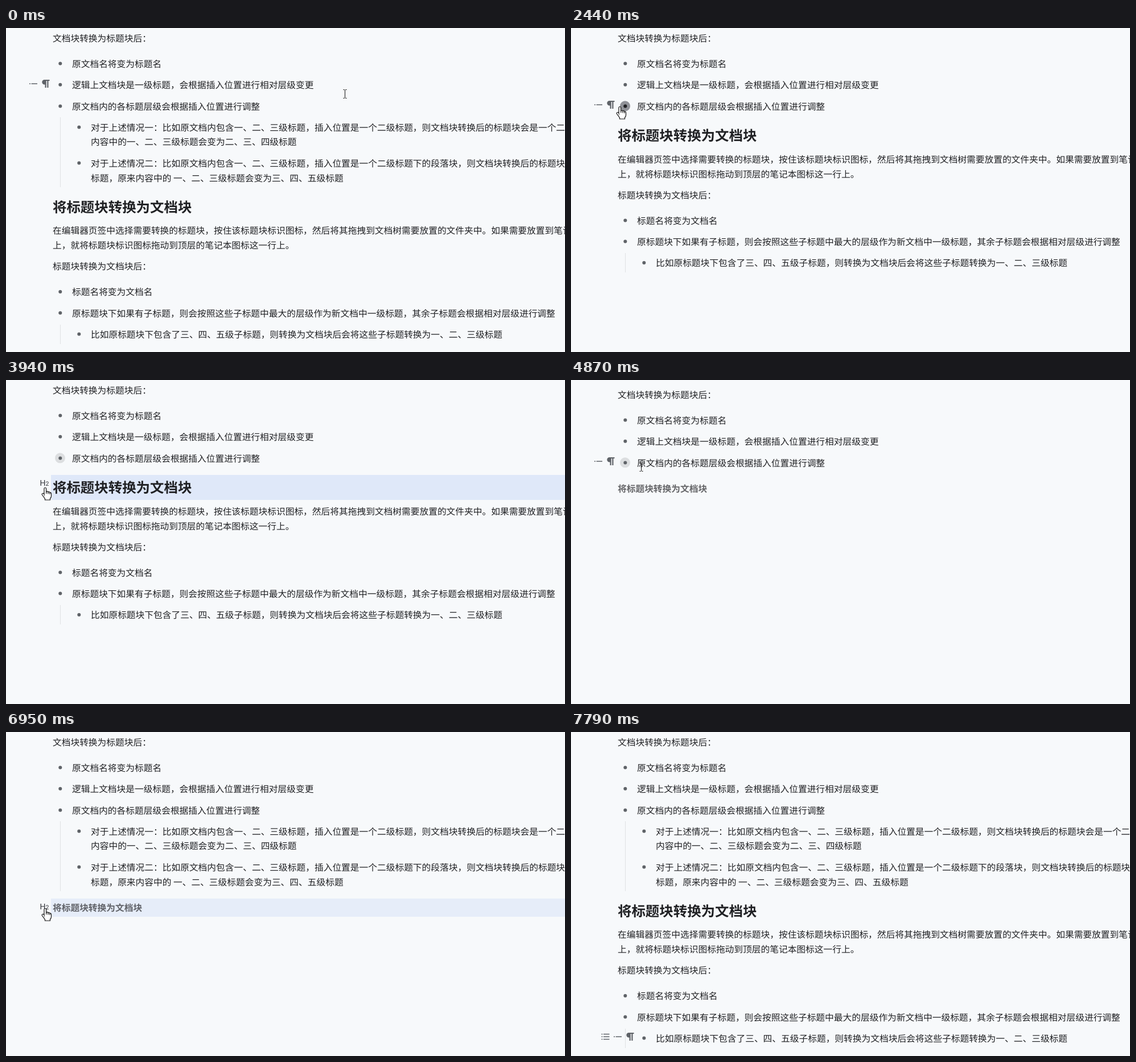
Recreate the animation shown at these times as an HTML page with a canvas. Size 982x570 px, loop 8.57 s.

```html
<!DOCTYPE html>
<html lang="zh-CN">
<head>
<meta charset="utf-8">
<style>
html, body { margin: 0; width: 100%; height: 100%; overflow: hidden; background: #f7f9fb; }
canvas { display: block; }
</style>
</head>
<body>
<canvas width="982" height="570"></canvas>
<script>
const ctx = document.querySelector('canvas').getContext('2d');
ctx.textRendering = 'geometricPrecision';
const LOOP = 8570, INK = '#202124', GREY = '#5f6368';
const LIST_FOLD = [1930, 5320], HEAD_FOLD = [3945, 6980];
const NESTED_HEIGHT = 125.6;

// [x, centre y, text, bullet]
const intro = [
  [82, 18, '文档块转换为标题块后：'],
  [116, 63, '原文档名将变为标题名', 1],
  [116, 100.3, '逻辑上文档块是一级标题，会根据插入位置进行相对层级变更', 1],
  [116, 138, '原文档内的各标题层级会根据插入位置进行调整', 1],
];
const nested = [
  [149, 175, '对于上述情况一：比如原文档内包含一、二、三级标题，插入位置是一个二级标题，则文档块转换后的标题块会是一个二级标题', 1],
  [149, 200.5, '内容中的一、二、三级标题会变为二、三、四级标题'],
  [149, 238, '对于上述情况二：比如原文档内包含一、二、三级标题，插入位置是一个二级标题下的段落块，则文档块转换后的标题块会是', 1],
  [149, 263.7, '标题，原来内容中的 一、二、三级标题会变为三、四、五级标题'],
];
const section = [
  [82, 356.5, '在编辑器页签中选择需要转换的标题块，按住该标题块标识图标，然后将其拖拽到文档树需要放置的文件夹中。如果需要放置到笔记本'],
  [82, 382.3, '上，就将标题块标识图标拖动到顶层的笔记本图标这一行上。'],
  [82, 419.5, '标题块转换为文档块后：'],
  [116, 464.5, '标题名将变为文档名', 1],
  [116, 501.7, '原标题块下如果有子标题，则会按照这些子标题中最大的层级作为新文档中一级标题，其余子标题会根据相对层级进行调整', 1],
  [149, 539, '比如原标题块下包含了三、四、五级子标题，则转换为文档块后会将这些子标题转换为一、二、三级标题', 1],
];

// Pointer: [time, x, y]
const path = [
  [0, 595, 116], [160, 595, 116], [600, 330, 140], [1010, 133, 155], [1030, 133, 155],
  [1510, 86, 138], [2440, 86, 138], [2800, 82, 170], [3250, 70, 190], [3380, 70, 190],
  [3600, 68, 188], [3900, 69, 189], [4370, 69, 189], [4640, 158, 172], [4870, 123, 153],
  [5120, 90, 147], [5690, 90, 147], [6100, 117, 295], [6530, 88, 326], [6740, 88, 326],
  [6900, 69, 310], [7250, 69, 310], [7580, 240, 360], [7600, 240, 360], [7790, 680, 590], [LOOP, 680, 590],
];
// Gutter icons: [time, kind, y]
const gutter = [
  [0, 'item', 98], [260, 'item', 135], [2700, 'h2', 181], [3960, '', 0], [4740, 'item', 143],
  [5320, '', 0], [5980, 'h2', 307], [7450, 'para', 354], [7660, 'list', 462], [7690, 'item', 499], [7720, 'nested', 536],
];

const between = (t, [a, b]) => t >= a && t < b;
const lerp = (a, b, k) => a + (b - a) * k;
const ease = k => k * k * (3 - 2 * k);

function pointerAt(t) {
  const i = Math.max(1, path.findIndex(p => p[0] > t));
  const [t0, x0, y0] = path[i - 1], [t1, x1, y1] = path[i];
  const k = ease((t - t0) / (t1 - t0));
  return [lerp(x0, x1, k), lerp(y0, y1, k)];
}

// 1 = full-size heading, 0 = folded
function headingSize(t) {
  const out = (start, length) => {
    const k = Math.min(1, Math.max(0, (t - start) / length));
    return 1 - (1 - k) ** 2;
  };
  return t < HEAD_FOLD[1] ? 1 - out(HEAD_FOLD[0], 75) : out(HEAD_FOLD[1], 95);
}

function text(str, x, y, size, weight = 400, family = '"Noto Sans CJK SC", "Noto Sans CJK"') {
  ctx.font = `${weight} ${size}px ${family}, sans-serif`;
  ctx.fillText(str, x, y);
}

function disc(x, y, r, color) {
  ctx.fillStyle = color;
  ctx.beginPath();
  ctx.arc(x, y, r, 0, 7);
  ctx.fill();
}

function rows(list, dy) {
  for (const [x, y, str, bullet] of list) {
    if (bullet) disc(x - 20.7, y + dy - .5, 3, GREY);
    ctx.fillStyle = INK;
    text(str, x, y + dy + 5.8, 15.72);
  }
}

function rule(y, height) {
  ctx.fillStyle = '#dfe1e4';
  ctx.fillRect(95, y, 1, height);
}

function drawGutter(kind, y, active) {
  ctx.fillStyle = active ? '#303238' : GREY;
  if (!kind) return;
  if (kind === 'h2') {
    text('H', 59.5, y + 5, 14, 400, 'Roboto');
    text('2', 69.5, y + 5, 10.5, 400, 'Roboto');
    return;
  }
  const dx = kind === 'nested' ? 34 : 0;
  ctx.save();
  ctx.translate(dx, y);
  ctx.fill(new Path2D('M76.5-7H67.5a4.2 4.2 0 0 0 0 8.4H68.5V7H70.7V-5H72.3V7H74.5V-5H76.5Z'));
  if (kind !== 'para') {
    ctx.fillRect(41, -.7, 2, 1.5);
    ctx.fillRect(44.5, -.7, 10.5, 1.5);
  }
  if (kind === 'list' || kind === 'nested') {
    for (const row of [-4.5, 0, 4.5]) {
      ctx.fillRect(19.5, row - .7, 2, 1.5);
      ctx.fillRect(23, row - .7, 10.5, 1.5);
    }
  }
  ctx.restore();
}

function drawPointer(x, y, hand) {
  ctx.save();
  ctx.translate(Math.round(x), Math.round(y));
  ctx.strokeStyle = '#111';
  ctx.lineWidth = 1.2;
  if (hand) {
    const shape = new Path2D('M-2 12V2Q-2 .5-.2 .5T1.6 2V7.5Q4.5 6 5 8Q7.5 7 8 9Q10.5 8.5 10.5 11V15Q10.5 18 8.5 19.5V22H-.5V20L-5.5 13Q-6.5 11-4.5 10.5T-2 12Z');
    ctx.fillStyle = '#fff';
    ctx.fill(shape);
    ctx.stroke(shape);
    ctx.stroke(new Path2D('M1.8 7V11M5 8V11.5M8 9V12'));
  } else {
    ctx.lineWidth = 1;
    ctx.stroke(new Path2D('M-2.5-7.5H-.5L.5-6.5L1.5-7.5H3.5M.5-7V7M-2.5 7.5H-.5L.5 6.5L1.5 7.5H3.5'));
  }
  ctx.restore();
}

function draw(t) {
  const listFolded = between(t, LIST_FOLD), headFolded = between(t, HEAD_FOLD);
  const full = headingSize(t);
  const scroll = listFolded ? 8 * (1 - full) : 0;
  const below = scroll - (listFolded ? NESTED_HEIGHT : 0);
  const [x, y] = pointerAt(t);
  const [, kind, gutterY] = gutter.findLast(g => t >= g[0]);
  const onBullet = Math.abs(x - 95) < 12 && Math.abs(y - 137.5 - scroll) < 12;
  const onH2 = kind === 'h2' && x > 56 && x < 80 && Math.abs(y - gutterY) < 13;

  ctx.fillStyle = '#f7f9fb';
  ctx.fillRect(0, 0, 982, 570);

  if (listFolded || onBullet) disc(95, 137.3 + scroll, 9, listFolded && onBullet ? '#909298' : '#dcdee0');
  rows(intro, scroll);
  if (listFolded && onBullet) disc(95.3, 137.5, 3, INK);
  if (!listFolded) {
    rule(157, 123);
    rows(nested, 0);
  }

  const middle = 309 + 5.5 * full + below;
  ctx.globalAlpha = lerp(.68, 1, full);
  if (onH2) {
    ctx.fillStyle = '#dfe8f9';
    ctx.fillRect(79, Math.round(middle - 16 - 6 * full), 903, 32 + 12 * full);
  }
  ctx.fillStyle = INK;
  const size = lerp(15.72, 24.45, full);
  text('将标题块转换为文档块', 82, middle + size * .38, size, 700);
  ctx.globalAlpha = 1;

  if (!headFolded) {
    const dy = below - 11.7 * (1 - full);
    rule(Math.round(521.5 + dy), 34);
    rows(section, dy);
  }
  drawGutter(kind, gutterY, onH2);
  drawPointer(x, y, onBullet || onH2);
}

function frame() {
  draw(performance.now() % LOOP);
  requestAnimationFrame(frame);
}
frame();
</script>
</body>
</html>
```
